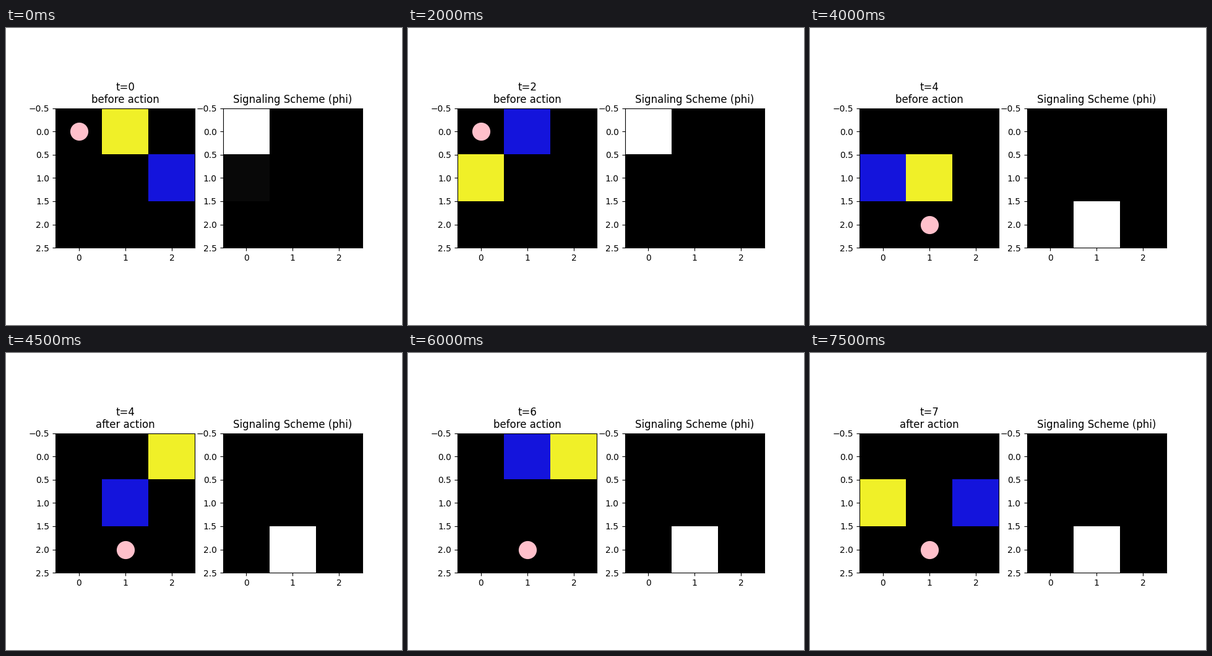
A matplotlib script that plays this animation: 640 by 480 pixels, repeating every 8000 ms.

```python
import numpy as np
import matplotlib.pyplot as plt
from matplotlib.animation import FuncAnimation

STEPS = 8
YELLOW, BLUE = (240, 240, 40), (20, 20, 220)
START = (1, 2)
GOALS = [(0, 1), (1, 0), (1, 1), (0, 2), (1, 2), (1, 0)]
LEAK = 0.035


def offset(blue, goal):
    return goal[0] - blue[0], goal[1] - blue[1]


def step(blue, goal):
    """Move one cell towards the goal, cutting corners through the middle column."""
    dr, dc = offset(blue, goal)
    if dr and (blue[1] == 1 or not dc):
        return blue[0] + int(np.sign(dr)), blue[1]
    return blue[0], blue[1] + int(np.sign(dc))


def state(k):
    """Blue and goal cells after k moves; a reached goal jumps to its next cell."""
    blue, eaten = START, 0
    for _ in range(k):
        blue = step(blue, GOALS[eaten])
        eaten += blue == GOALS[eaten]
    return blue, GOALS[eaten]


def signal(blue, goal):
    """The signalled cell tells whether the goal lies left, above or elsewhere."""
    dr, dc = offset(blue, goal)
    if dc < 0:
        return 0, 0
    return (1, 0) if dr < 0 else (2, 1)


def world(blue, goal):
    grid = np.zeros((3, 3, 3), dtype=np.uint8)
    grid[goal] = YELLOW
    grid[blue] = BLUE
    return grid


def scheme(blue, goal):
    phi = np.zeros((3, 3))
    phi[signal(blue, goal)] = 1
    if max(offset(blue, goal)) < 0:
        phi[1, 0] = LEAK
    return phi


fig, (ax_world, ax_phi) = plt.subplots(1, 2, figsize=(6.4, 4.8), dpi=100)
world_img = ax_world.imshow(world(*state(0)))
phi_img = ax_phi.imshow(scheme(*state(0)), cmap="gray", vmin=0, vmax=1)
dot, = ax_world.plot([0], [0], "o", color="pink", markersize=20)
ax_world.set(xlim=(-0.5, 2.5), ylim=(2.5, -0.5))
title = ax_world.set_title("t=0\nbefore action")
ax_phi.set_title("Signaling Scheme (phi)")


def update(i):
    t, acted = divmod(i, 2)
    before = state(t)
    row, col = signal(*before)
    world_img.set_data(world(*state(t + acted)))
    phi_img.set_data(scheme(*before))
    dot.set_data([col], [row])
    title.set_text(f"t={t}\n{'after' if acted else 'before'} action")
    return world_img, phi_img, dot, title


anim = FuncAnimation(fig, update, frames=2 * STEPS, interval=500,
                     repeat=True, repeat_delay=0, blit=False)
plt.show()
```
